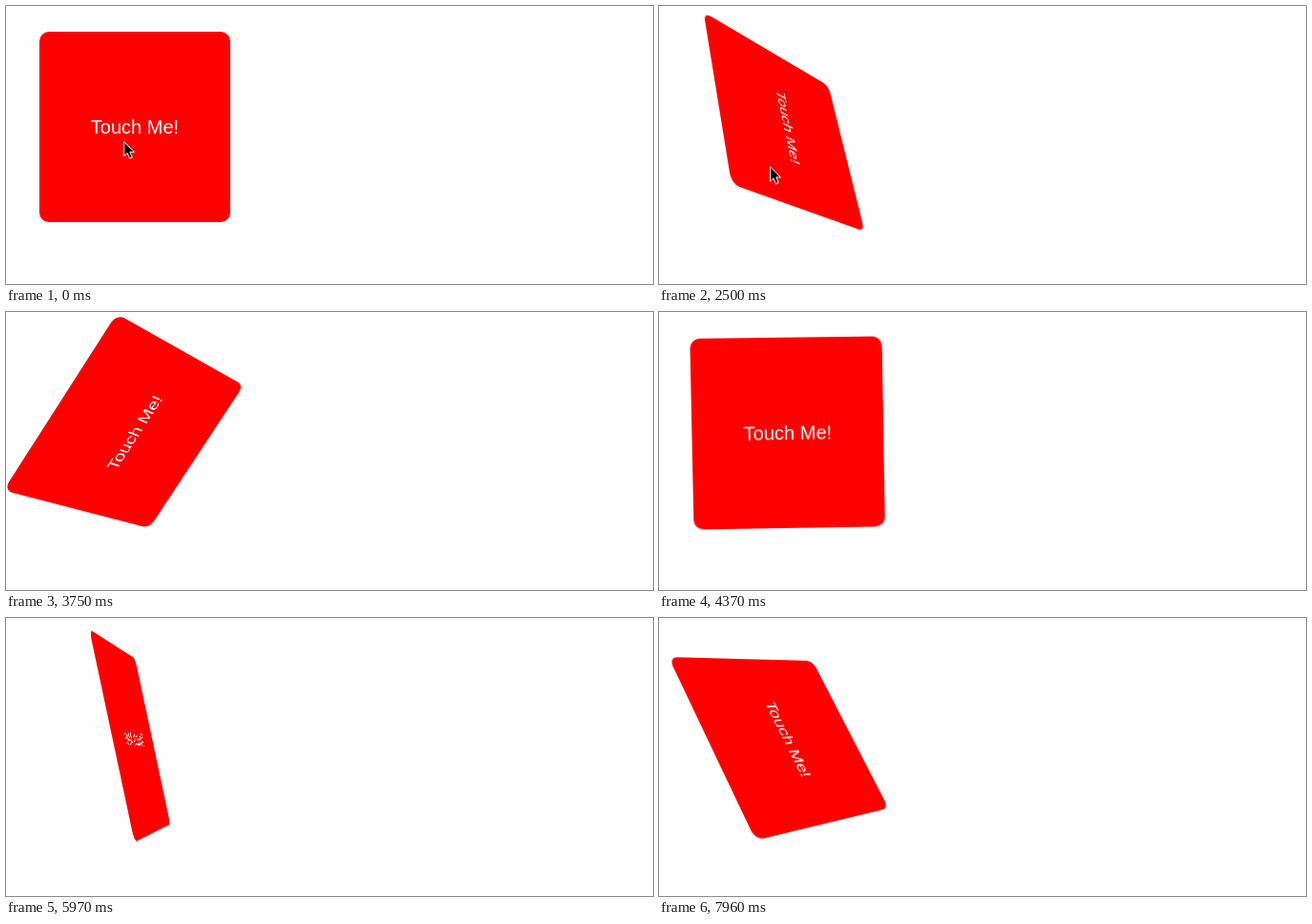
These frames come from a looping animation (678x292 px, 8 s). An HTML page:

```html
<!DOCTYPE html>
<html lang="en">
<head>
<meta charset="utf-8">
<title>Touch Me</title>
<style>
  html, body { margin: 0; width: 100%; height: 100%; overflow: hidden; background: #fefefe; }
  #stage {
    position: fixed; inset: 0; overflow: hidden; contain: strict;
    perspective: 800px; perspective-origin: 339px 146px;
  }
  #box {
    position: absolute; left: 35px; top: 27px; width: 200px; height: 200px;
    border-radius: 10px; background: #f00; color: #fff;
    font: 20px/200px "Liberation Sans", Arial, sans-serif; text-align: center;
  }
  #cursor { position: absolute; left: 0; top: 0; width: 16px; height: 22px; }
</style>
</head>
<body>
<div id="stage">
  <div id="box">Touch Me!</div>
  <svg id="cursor" viewBox="0 0 16 22">
    <path d="M.5 .5V15.6L4 12.4L6.5 18.2L9.2 17L6.7 11.3H11.4Z" fill="#000" stroke="#fff"/>
  </svg>
</div>
<script>
  const LOOP = 8000;

  const turn = deg => `rotateX(${deg}deg) rotateY(${deg}deg) rotateZ(${deg}deg)`;
  const move = (x, y) => `translate(${x}px, ${y}px)`;
  const at = (ms, transform) => ({ offset: ms / LOOP, transform });
  const play = (id, steps) =>
    document.getElementById(id).animate(steps, { duration: LOOP, iterations: Infinity });

  // One angle turns all three axes at a nearly steady rate
  play("box", [
    at(0, turn(0)), at(1605, turn(0)), at(3200, turn(102)), at(5280, turn(239)), at(LOOP, turn(409))
  ]);

  // The pointer circles the box, rests, then leaves downwards
  play("cursor", [
    at(0, move(123, 142)), at(400, move(195, 128)), at(640, move(150, 230)), at(840, move(104, 215)),
    at(1260, move(116, 168)), at(2500, move(116, 168)), at(2800, move(128, 300)), at(LOOP, move(128, 300))
  ]);
</script>
</body>
</html>
```
